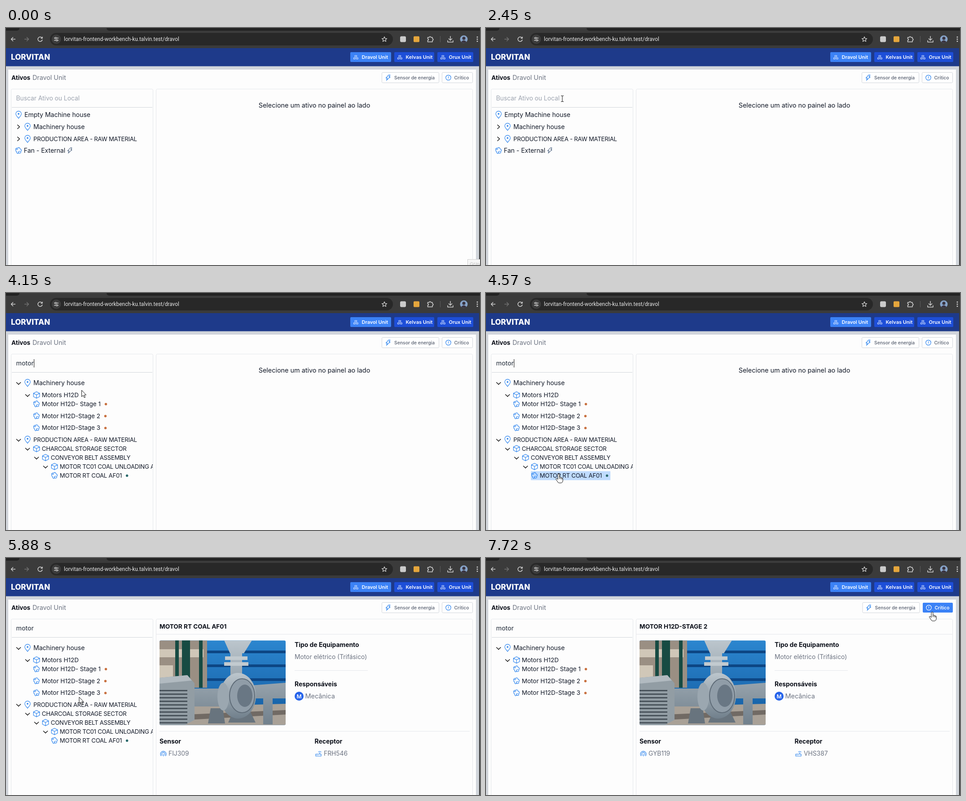
Recreate the animation shown at these times as an HTML page. Size 1056x530 px, loop 8 s.

```html
<!DOCTYPE html>
<html lang="pt">
<head>
<meta charset="utf-8">
<title>Ativos</title>
<style>
  html, body { margin: 0; width: 100%; height: 100%; overflow: hidden; background: #d1d5db; }
  svg { display: block; width: 1056px; height: 530px; }
  text { font: 14px Inter, sans-serif; fill: #111827; white-space: pre; }
  .b { font-weight: 700; font-size: 13.9px; fill: #0b0f19; }
  .g { fill: #6b7280; font-size: 13.8px; }
  .caps { font-size: 13.2px; letter-spacing: -.25px; }
  .code { font-size: 13.5px; }
  .id { fill: #6b7280; font-size: 13.8px; }
  .unit { font-weight: 600; font-size: 11px; fill: #fff; }
  .btn { font-weight: 600; font-size: 10.3px; fill: #6b7280; }
  .url { font: 11.9px Roboto, sans-serif; fill: #e6e6e6; }
  .line { fill: none; stroke: #e5e7eb; }
  .ico { fill: none; stroke: #2b83ee; stroke-width: 1.15; stroke-linejoin: round; stroke-linecap: round; }
  .bar { fill: none; stroke: #cfcfcf; stroke-width: 1.5; stroke-linejoin: round; }
  .on rect { fill: #3b82f6; stroke: none; x: 972px; y: 100px; width: 67px; height: 22px; }
  .on text { fill: #fff; }
  .on use { stroke: #fff; }
</style>
</head>
<body>
<svg viewBox="0 0 1056 530">
  <defs>
    <path id="pin" d="M0 8C-4 3.5-6.2 1-6.2-2a6.2 6.2 0 0 1 12.4 0C6.2 1 4 3.5 0 8zM-.9-2a.9.9 0 1 0 1.8 0a.9.9 0 1 0-1.8 0"/>
    <path id="cube" d="M0-7.2L6.8-3.8V3.8L0 7.2L-6.8 3.8V-3.8ZM-6.8-3.8L0-.3L6.8-3.8M0-.3V7.2"/>
    <path id="part" d="M-6.3-3.8l2.6-2 2 .8 1.4-1.9 3 1 .6 2.6 2.4.7.8 3-1.7 1.6.2 3-2.8 1.2-1.6-1-2.4 1.6-2.4-1.8.2-2.6-2.2-1.2zM-6.3-3.8l3 1.6 2-1M-.5 5.5l.5-3.3 3-.6"/>
    <path id="bolt" d="M1.5-6H4.8L2.2-1.6H5L-3.4 6L-1.4.8H-4.6Z"/>
    <path id="right" d="M-2.3-4.3L2.3 0L-2.3 4.3"/>
    <path id="down" d="M-4.6-2L0 2.6L4.6-2"/>
    <g id="org"><rect x="-2" y="-4" width="4" height="3"/><rect x="-4.7" y="1" width="3.4" height="3"/><rect x="1.3" y="1" width="3.4" height="3"/></g>
    <path id="alert" d="M-5.7 0a5.7 5.7 0 1 0 11.4 0a5.7 5.7 0 1 0-11.4 0M0-2.8V.4M0 2.6V2.7"/>
    <path id="wave" d="M-5 4.5a6.4 6.4 0 1 1 10 0M-2.6 3.2a3.7 3.7 0 1 1 5.2 0M0 .8V5"/>
    <path id="router" d="M-6 1H6V5.5H-6ZM3 1V-3M0-3.6a4 4 0 0 1 6 0M-3.5 3.2h.2M-1 3.2h.2"/>
    <clipPath id="side"><rect x="13" y="137" width="314" height="393"/></clipPath>
    <clipPath id="frame"><rect x="342" y="184.5" width="281" height="189" rx="3"/></clipPath>
    <linearGradient id="sky" x2="0" y2="1"><stop stop-color="#2c86cf"/><stop offset="1" stop-color="#125a9f"/></linearGradient>
    <linearGradient id="steel" x2="0" y2="1"><stop stop-color="#bcc6cd"/><stop offset="1" stop-color="#71808c"/></linearGradient>
  </defs>

  <!-- browser bar -->
  <path fill="#3b3b3b" d="M0 0H1056V46H0Z"/>
  <path fill="#232323" d="M0 0H30Q30 6 22 6H0ZM224 0H1056V6H232Q224 6 224 0Z"/>
  <rect x="98" y="11" width="764" height="28" rx="14" fill="#282828"/>
  <circle cx="112" cy="25" r="10.5" fill="#3d3d3d"/>
  <g class="bar">
    <path d="M21 25H11.5M16 20.5L11.5 25L16 29.5"/>
    <path stroke="#727272" d="M41 25H50.5M46 20.5L50.5 25L46 29.5"/>
    <path d="M80.2 22.2A5 5 0 1 0 81 26M81 19.5V23H77.5"/>
    <path stroke-width="1.3" d="M107 22.5H109M112.5 22.5H117M107 27.5H111.5M115 27.5H117M109 22.5a1.7 1.7 0 1 0 3.4 0a1.7 1.7 0 1 0-3.4 0M111.6 27.5a1.7 1.7 0 1 0 3.4 0a1.7 1.7 0 1 0-3.4 0"/>
    <path stroke-width="1.3" d="M843 19.5L844.6 23.3L848.6 23.6L845.5 26.2L846.5 30.2L843 28L839.5 30.2L840.5 26.2L837.4 23.6L841.4 23.3Z"/>
    <path d="M939.5 21H943a1.8 1.8 0 0 1 3.6 0H950V24a1.8 1.8 0 0 1 0 3.6V31H939.5V27.6a1.8 1.8 0 0 0 0-3.6Z"/>
    <path d="M990 18V27M986 23.5L990 27.5L994 23.5M984 27.5V31.5H996V27.5"/>
    <path stroke="#5c5c5c" stroke-width="1" d="M967.5 18V32"/>
  </g>
  <rect x="878" y="18.5" width="13" height="13" rx="3" fill="#cbcbcb"/>
  <rect x="908" y="18.5" width="13" height="13" rx="2" fill="#e5a63c"/>
  <circle cx="1020" cy="25" r="8.5" fill="#86a3c9"/>
  <path fill="#3a3440" d="M1016.5 23a3.5 3.5 0 1 1 7 0a3.5 3.5 0 1 1-7 0M1014 31q6-7 12 0q-6 5-12 0"/>
  <path fill="#cfcfcf" d="M1048.7 19h2.6v2.6h-2.6zM1048.7 23.7h2.6v2.6h-2.6zM1048.7 28.4h2.6V31h-2.6z"/>
  <text class="url" x="129" y="29.3">lorvitan-frontend-workbench-ku.talvin.test/dravol</text>

  <!-- page -->
  <rect y="85" width="1056" height="445" fill="#d1d5db"/>
  <rect y="45" width="1056" height="40.5" fill="#1e3a8a"/>
  <text x="11" y="71" style="font-size:17px;font-weight:800;fill:#fff">LORVITAN</text>
  <g id="units"></g>
  <rect x="5" y="93" width="1042" height="437" fill="#fdfdfd"/>
  <rect x="1054" y="45" width="2" height="485" fill="#3b3b3b"/>
  <text class="b" x="12" y="115.5" style="font-size:13.5px">Ativos</text>
  <text class="g" x="59" y="115.5" style="font-size:14.3px">Dravol Unit</text>
  <g id="energy">
    <rect x="837.5" y="99.5" width="127" height="23" rx="2" fill="#fff" stroke="#d1d5db"/>
    <use href="#bolt" class="ico" x="851" y="111"/>
    <text class="btn" x="865" y="115">Sensor de energia</text>
  </g>
  <g id="critical">
    <rect x="971.5" y="99.5" width="68" height="23" rx="2" fill="#fff" stroke="#d1d5db"/>
    <use href="#alert" class="ico" x="985.5" y="111"/>
    <text class="btn" x="998.5" y="115">Crítico</text>
  </g>
  <path class="line" d="M11.5 530V139.5q0-3 3-3H324.5q3 0 3 3V530M334.5 530V139.5q0-3 3-3H1036.5q3 0 3 3V530"/>
  <path class="line" style="stroke:#d1d5db" d="M13 177.5H326"/>
  <text id="query" x="22.5" y="161.5"></text>
  <rect id="caret" y="148" width="1" height="18.5" fill="#111"/>
  <g clip-path="url(#side)"><g id="closed"></g><g id="first"></g><g id="open"></g></g>

  <text id="hint" x="687" y="178" text-anchor="middle" style="font-size:14.4px">Selecione um ativo no painel ao lado</text>
  <g id="detail">
    <text class="b" id="title" x="342" y="158" style="font-size:13.6px"></text>
    <path class="line" d="M335 170.5H1040"/>
    <g id="photo" clip-path="url(#frame)">
      <rect x="342" y="184" width="281" height="190" fill="url(#sky)"/>
      <path stroke="#0d4684" stroke-width="180" stroke-dasharray="6 25" d="M533 207V330"/>
      <path fill="#9a8f83" d="M342 184H448V290H342Z"/>
      <path fill="#d0c7b8" d="M342 204H440V222H342ZM342 240H372V270H342Z"/>
      <path fill="#174b43" d="M377 184H385V285H377ZM392 184H410V290H392ZM430 184H438V290H430Z"/>
      <path fill="#a9a197" d="M342 334L623 326V374H342Z"/>
      <path fill="#716a64" d="M405 350L623 340V350L405 362Z"/>
      <path fill="url(#steel)" d="M486 184H548L530 213H499ZM500 213H526V262H500ZM410 292H500V332H410ZM545 285L623 279V314H545ZM573 312H594V372H573Z"/>
      <path fill="#c2cacf" d="M488 220H538V228H488ZM486 233H540V241H486Z"/>
      <path fill="#68747e" d="M456 336H483L488 370H450ZM505 345H545L556 368H495Z"/>
      <ellipse cx="517" cy="308" rx="40" ry="51" fill="url(#steel)"/>
      <ellipse cx="526" cy="308" rx="28" ry="38" fill="#909da8" stroke="#5f6c78" stroke-width="2"/>
      <ellipse cx="532" cy="308" rx="17" ry="25" fill="#697784"/>
      <ellipse cx="484" cy="310" rx="13" ry="31" fill="#9ba7b0"/>
      <path fill="#929da4" d="M342 268L404 262L420 280V362L398 374H342Z"/>
      <path stroke="#48525a" stroke-width="62" stroke-dasharray="3 5" d="M373 295V372"/>
      <path fill="#b1bac0" d="M342 268L404 262L414 274L342 281Z"/>
    </g>
    <g id="info">
      <text class="b" x="362" y="199">Tipo de Equipamento</text>
      <text class="g" x="362" y="226">Motor elétrico (Trifásico)</text>
      <path class="line" d="M362 251.5H525"/>
      <text class="b" x="362" y="287">Responsáveis</text>
      <circle cx="372" cy="309" r="10" fill="#2563eb"/>
      <text x="372" y="313.5" text-anchor="middle" style="font-size:12px;font-weight:600;fill:#fff">M</text>
      <text class="g" x="385.5" y="314" style="font-size:14.4px">Mecânica</text>
    </g>
    <g id="lower">
      <path class="line" d="M342 333.5H1033"/>
      <text class="b" x="342" y="361">Sensor</text>
      <text class="b" x="687.5" y="361">Receptor</text>
      <use href="#wave" class="ico" x="350.5" y="384"/>
      <use href="#router" class="ico" x="696" y="383.5"/>
      <text class="id" id="sensor" x="362" y="388"></text>
      <text class="id" id="receiver" x="708" y="388"></text>
    </g>
  </g>
  <g id="tip"><rect x="1028.5" y="517.5" width="30" height="14" fill="#f6f6f6" stroke="#cfcfcf"/><text x="1033" y="532" style="font-size:11px;fill:#c4c4c4">Grav</text></g>

  <g id="cursor" stroke="#111" stroke-width="1" fill="#fff" stroke-linejoin="round">
    <path id="arrow" d="M0 0V14.5L3.4 11.4L5.8 16.6L8 15.7L5.7 10.6H10Z"/>
    <path id="hand" d="M-1.9 1.6a1.9 1.9 0 0 1 3.8 0V7c1-.8 2.8-.4 3 .8 1-.6 2.3-.2 2.5.9 1-.3 1.8.4 1.8 1.6V14c0 3.5-1.7 5.8-4.4 5.8H1.4c-2 0-3-1-4-3l-3.6-5.4c-.7-1.4.9-2.6 2.2-1.5l2.1 2zM1.9 7v4M4.9 8v3.4M7.4 9v2.8"/>
    <path id="beam" fill="none" d="M-3-6.5H-1L0-6L1-6.5H3M0-6V6M-3 6.5H-1L0 6L1 6.5H3"/>
  </g>
</svg>
<script>
const NS = 'http://www.w3.org/2000/svg';
const $ = id => document.getElementById(id);
const LOOP = 8000;

function add(parent, tag, attrs, text) {
  const node = document.createElementNS(NS, tag);
  for (const k in attrs) node.setAttribute(k, attrs[k]);
  if (text) node.textContent = text;
  parent.appendChild(node);
  return node;
}
const icon = (g, name, x, y, style) => add(g, 'use', { href: '#' + name, class: 'ico', x, y, style: style || '' });
const show = (node, on) => { node.style.display = on ? '' : 'none'; };
const move = (node, x, y) => node.setAttribute('transform', `translate(${x} ${y})`);

[['Dravol', 767, 91, '#3b82f6'], ['Kelvas', 865, 89, '#1d4ed8'], ['Orux', 961, 80, '#1d4ed8']].forEach(([name, x, w, fill]) => {
  add($('units'), 'rect', { x, y: 54, width: w, height: 22, rx: 2, fill });
  icon($('units'), 'org', x + 12.5, 65.5, 'stroke:#dbe7ff;stroke-width:1');
  add($('units'), 'text', { x: x + 25.5, y: 69, class: 'unit' }, name + ' Unit');
});

// One tree line: arrow, icon, label and an optional status mark.
function row(parent, y, depth, kind, label, opt = {}) {
  const g = add(parent, 'g');
  const x = 28 + depth * 20;
  if (opt.arrow) icon(g, opt.arrow, x, y + (opt.arrow === 'down' ? 1 : 0), 'stroke:#111;stroke-width:1.4');
  const ix = opt.arrow ? x + 20 : x;
  icon(g, kind, ix, y);
  if (kind === 'pin') add(g, 'circle', { cx: ix, cy: y - 2, r: 1.8, fill: '#2b83ee' });
  const tx = ix + (kind === 'pin' ? 13 : 11.8);
  const text = add(g, 'text', { x: tx, y: y + 5, class: opt.cls || '' }, label);
  const end = tx + text.getComputedTextLength();
  if (opt.dot) add(g, 'circle', { cx: end + 11.5, cy: y + .5, r: 2.7, fill: opt.dot });
  if (opt.bolt) icon(g, 'bolt', end + 10, y, 'stroke:#1f3a5f;stroke-width:1');
  const left = (opt.arrow ? x : ix) - 8;
  const right = Math.min(327, end + (opt.dot ? 19 : opt.bolt ? 18 : 3));
  const glow = add(g, 'rect', { x: left, y: y - 9.5, width: right - left, height: 20, fill: '#bfdbfe' });
  g.insertBefore(glow, g.firstChild);
  return { g, y, left, right, glow, tint: opt.tint !== false };
}

const ORANGE = '#c8703f', TEAL = '#2b6a6c', caps = 'caps', code = 'code';
const plain = { tint: false };
const closedRows = [
  row($('closed'), 194, 0, 'pin', 'Empty Machine house', plain),
  row($('closed'), 221, 0, 'pin', 'Machinery house', { arrow: 'right', tint: false }),
  row($('closed'), 248, 0, 'pin', 'PRODUCTION AREA - RAW MATERIAL', { arrow: 'right', tint: false, cls: caps }),
  row($('closed'), 274, 0, 'part', 'Fan - External', { bolt: true })
];
show(row($('first'), 194, 0, 'pin', 'Empty Machine house', plain).glow, false);
const openRows = [
  row($('open'), 201, 0, 'pin', 'Machinery house', { arrow: 'down' }),
  row($('open'), 228, 1, 'cube', 'Motors H12D', { arrow: 'down', cls: code }),
  ...['- Stage 1', '-Stage 2', '-Stage 3'].map((s, i) =>
    row($('open'), 248 + i * 26.7, 2, 'part', 'Motor H12D' + s, { dot: ORANGE, cls: code })),
  row($('open'), 328, 0, 'pin', 'PRODUCTION AREA - RAW MATERIAL', { arrow: 'down', cls: caps }),
  row($('open'), 348, 1, 'cube', 'CHARCOAL STORAGE SECTOR', { arrow: 'down', cls: caps }),
  row($('open'), 368, 2, 'cube', 'CONVEYOR BELT ASSEMBLY', { arrow: 'down', cls: caps }),
  row($('open'), 388, 3, 'cube', 'MOTOR TC01 COAL UNLOADING AF02', { arrow: 'down', cls: caps }),
  row($('open'), 408, 4, 'part', 'MOTOR RT COAL AF01', { dot: TEAL, cls: caps })
];

// Pointer: bursts of 70 ms steps along a polyline of [time, x, y].
const bursts = [[210, 420], [620, 900], [1290, 2050], [3810, 4570], [4640, 5390], [5460, 6230], [6300, 7100], [7170, 7720]];
const path = [
  [210, 760, 480], [420, 301, 386], [620, 290, 383], [900, 185, 348], [1290, 180, 338],
  [1430, 143, 272], [1500, 149, 241], [1780, 160, 180], [1920, 170, 158], [3810, 170, 160],
  [4200, 168, 240], [4570, 162, 405], [5060, 162, 405], [5270, 154, 380], [5390, 153, 372],
  [5460, 153, 366], [5880, 163, 311], [6090, 165, 285], [6230, 165, 276], [6580, 165, 276],
  [7100, 915, 133], [7170, 930, 130], [7520, 994, 121], [8000, 994, 121]
];
function pointer(t) {
  const [s, e] = bursts.filter(b => b[0] <= t).pop();
  const q = t >= e ? e : s + Math.floor((t - s) / 70) * 70;
  const i = path.findIndex(p => p[0] > q);
  const [a, b] = [path[i - 1], path[i]];
  const u = (q - a[0]) / (b[0] - a[0]);
  return [a[1] + (b[1] - a[1]) * u, a[2] + (b[2] - a[2]) * u];
}

function caretOn(t) {
  if (t < 1920 || t >= 4640) return false;
  if (t < 2650) return t < 2450;
  return t < 3050 || Math.floor((t - 3050) / 530) % 2 === 0;
}

function render(t) {
  const typed = t < 2650 ? 0 : Math.min(5, 1 + Math.floor((t - 2650) / 100));
  const filtered = typed > 0, critical = t >= 7590;
  const detail = t >= 4780, photo = t >= 5600, second = t >= 6440;

  show($('tip'), t < 70);
  $('query').textContent = typed ? 'motor'.slice(0, typed) : 'Buscar Ativo ou Local';
  $('query').style.fill = typed ? '#1f2937' : '#9ca3af';
  $('query').style.fontSize = typed ? '14.2px' : '13.8px';
  show($('caret'), caretOn(t));
  $('caret').setAttribute('x', typed ? Math.round(22.5 + $('query').getComputedTextLength()) : 23);

  show($('closed'), !filtered);
  show($('open'), filtered);
  show($('first'), typed === 1);
  move($('open'), 0, typed === 1 ? 20 : 0);
  openRows.forEach((r, i) => show(r.g, i < 5 || !critical));

  show($('hint'), !detail);
  show($('detail'), detail);
  show($('photo'), photo);
  move($('info'), photo ? 281 : 0, 0);
  move($('lower'), 0, photo ? 54 : 0);
  $('title').textContent = second ? 'MOTOR H12D-STAGE 2' : 'MOTOR RT COAL AF01';
  $('sensor').textContent = second ? 'GYB119' : 'FIJ309';
  $('receiver').textContent = second ? 'VHS387' : 'FRH546';

  $('critical').setAttribute('class', critical ? 'on' : '');
  move($('critical'), critical ? 1 : 0, 0);
  move($('energy'), critical ? 1.5 : 0, 0);

  const [x, y] = t < 210 ? [-50, -50] : pointer(t);
  let hover = false;
  for (const r of filtered ? openRows : closedRows) {
    const hit = x >= r.left && x <= r.right && Math.abs(y - r.y) <= 9.5;
    show(r.glow, hit && r.tint);
    hover = hover || hit;
  }
  const button = y > 99 && y < 123 && x > 837 && x < 1040;
  const beam = x > 12 && x < 327 && y > 137 && y < 177;
  show($('hand'), hover || button);
  show($('beam'), beam);
  show($('arrow'), !hover && !button && !beam);
  move($('cursor'), x, y);
}

const start = performance.now();
function tick() {
  render((performance.now() - start) % LOOP);
  requestAnimationFrame(tick);
}
tick();
</script>
</body>
</html>
```
